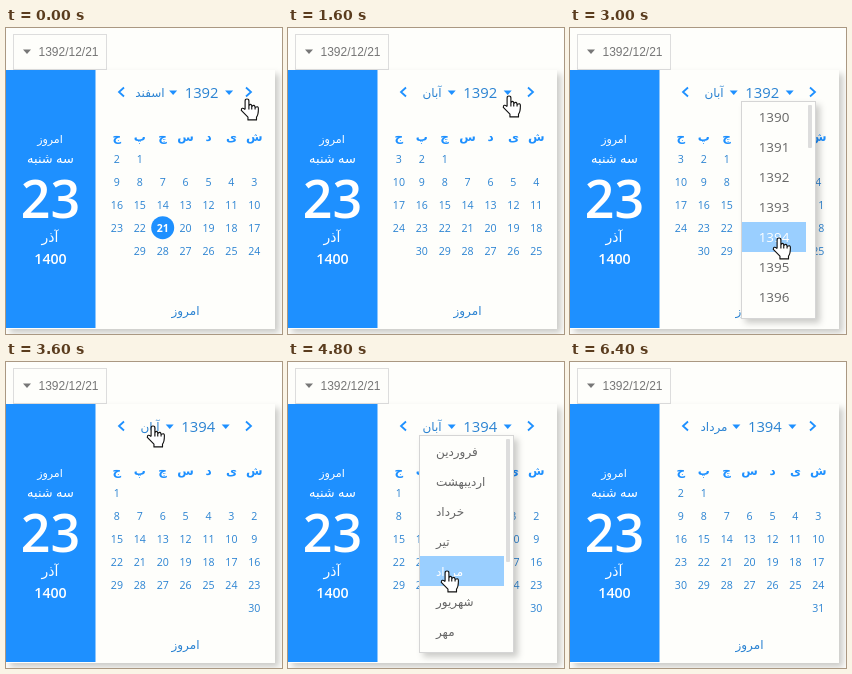
Write an HTML page that moves like this. It is 276 by 306 pixels and loops after 7.2 s.

```html
<!DOCTYPE html>
<html lang="fa">
<head>
<meta charset="utf-8">
<style>
html, body { margin: 0; width: 100%; height: 100%; overflow: hidden; background: #fefefb; }
svg { display: block; width: 276px; height: 306px; font-family: "Open Sans", "DejaVu Sans", sans-serif; }
.shadow { filter: drop-shadow(4px 4px 3px #0003); }
</style>
</head>
<body>
<svg id="stage" viewBox="0 0 276 306"></svg>
<script>
const LOOP = 7200, STEP = 200, MOVE = 400;
const BLUE = '#1e90ff', INK = '#2b83d2', PAPER = '#fefefb';
const MONTHS = 'فروردین اردیبهشت خرداد تیر مرداد شهریور مهر آبان آذر دی بهمن اسفند'.split(' ');
const YEARS = Array.from({ length: 7 }, (_, i) => 1390 + i);
const BACK_CLICKS = [600, 1000, 1200, 1400], YEAR_CLICK = 3200, MONTH_CLICK = 5000, EXIT = 6400;

// pointer stops: arrival time, x, y
const STOPS = [
  [0, 241, 71], [1800, 201, 65], [2800, 209, 210], [3600, 147, 64],
  [4400, 145, 110], [4800, 159, 209], [5400, 161, 212]
];

const pen = document.createElement('canvas').getContext('2d');
pen.font = '12px "Open Sans", "DejaVu Sans", sans-serif';

const text = (s, x, y, size, fill = INK, more = '') =>
  `<text x="${x}" y="${y}" font-size="${size}" fill="${fill}" text-anchor="middle" ${more}>${s}</text>`;
const rect = (x, y, w, h, fill, more = '') =>
  `<rect x="${x}" y="${y}" width="${w}" height="${h}" fill="${fill}" ${more}/>`;
const caret = (x, y, fill = BLUE) => `<path d="M${x - 4} ${y - 2}h8l-4 4.5z" fill="${fill}"/>`;
const chevron = (x, dir) =>
  `<path d="M${x + 2.5 * dir} 59.5l${-5 * dir} 4.5l${5 * dir} 4.5" fill="none" stroke="${BLUE}" stroke-width="1.8"/>`;
const column = i => 248.3 - 22.9 * (i % 7);
const BOLD = 'font-weight="bold"', SEMI = 'font-weight="600"';

function pointerAt(t) {
  const i = STOPS.findLastIndex(s => s[0] - MOVE <= t);
  const [end, x, y] = STOPS[i], [, x0, y0] = STOPS[Math.max(i - 1, 0)];
  const k = Math.min(1, (t - end) / MOVE + 1), e = k * k * (3 - 2 * k);
  return [x0 + (x - x0) * e, y0 + (y - y0) * e];
}

const frame =
  rect(7.5, 6.5, 93, 35, PAPER, 'stroke="#ddd"') + caret(21, 23.5, '#777') +
  text('1392/12/21', 62.5, 28, 12, '#777', 'font-family="Liberation Sans, sans-serif"') +
  `<g class="shadow">${rect(0, 42, 269, 259, PAPER)}</g>` + rect(0, 42, 89.5, 258, BLUE) +
  text('امروز', 44, 115, 11, '#fff') + text('سه شنبه', 44.5, 135, 13, '#fff') +
  text('23', 44.5, 190, 52, '#fff', SEMI) + text('آذر', 44, 214, 14, '#fff') +
  text('1400', 44.5, 236, 14.2, '#fff', SEMI) +
  [...'شیدسچپج'].map((d, i) => text(d, column(i), 112.5, 12, BLUE, BOLD)).join('') +
  text('امروز', 179.5, 287, 12) + chevron(115.5, 1) + chevron(242.5, -1);

function calendar(month, year) {
  const name = MONTHS[month], shift = (pen.measureText(name).width - 26) / 3;
  let out = text(name, 144, 69, 12) + caret(166 + shift, 64.5) +
    text(year, 194.5 + shift, 70, 14.8) + caret(222 + shift, 64.5);
  const length = month < 6 ? 31 : month < 11 ? 30 : 29;
  const first = (5 + 365 * (year - 1392) + 30 * month + Math.min(month, 6)) % 7;
  for (let d = 1; d <= length; d++) {
    const n = first + d - 1, x = column(n), y = 131 + 22.9 * Math.floor(n / 7);
    const picked = year == 1392 && month == 11 && d == 21;
    if (picked) out += `<circle cx="${x}" cy="${y}" r="11.5" fill="${BLUE}"/>`;
    out += picked ? text(d, x, y + 4, 10.6, '#fff', BOLD) : text(d, x, y + 4, 10.6);
  }
  return out;
}

function menu(items, x, w, thumb, pointerY, label) {
  const hover = Math.floor((pointerY - 75) / 30);
  return `<g class="shadow">${rect(x + .5, 73.5, w, 217, PAPER, 'stroke="#d5d5d5"')}</g>` +
    rect(x + w - 7, 77, 4, thumb, '#ddd', 'rx="1"') +
    items.map((s, i) => (i == hover ? rect(x + 1, 74 + 30 * i, w - 10, 30, '#9acfff') : '') +
      label(s, 93.5 + 30 * i, i == hover ? '#fff' : '#666')).join('');
}
const yearLabel = (s, y, fill) => text(s, 204, y + .5, 13.4, fill);
const monthLabel = (s, y, fill) => text(s, 148, y, 12, fill, 'style="text-anchor:start"');

function cursor(x, y, hand) {
  const d = hand
    ? 'M-2 11V2Q-2 0 0 0T2 2V7Q5 4 5 8Q8 5 8.5 9Q12 7 12 10Q12 17 10 19V22H1V19L-6 12Q-6 8-2 11M2 6V11M5 7V11M8.5 8V11'
    : 'M0 0V16L4 12.5L7 19L10 17.5L7 11.5H12Z';
  return `<path transform="translate(${x} ${y}) scale(.95)" d="${d}" fill="#fff" stroke="#111" stroke-width="1.2" stroke-linejoin="round"/>`;
}

function draw(now) {
  const t = Math.floor(now % LOOP / STEP) * STEP, [x, y] = pointerAt(t);
  const month = t < MONTH_CLICK ? 11 - BACK_CLICKS.filter(c => c <= t).length : 4;
  let out = frame + calendar(month, t < YEAR_CLICK ? 1392 : 1394);
  if (t >= 2000 && t < YEAR_CLICK) out += menu(YEARS, 171, 74, 43, y, yearLabel);
  if (t >= 4000 && t < MONTH_CLICK) out += menu(MONTHS.slice(0, 7), 131, 94, 123, y, monthLabel);
  if (t < EXIT) out += cursor(x, y, t < MONTH_CLICK);
  stage.innerHTML = out;
}

const stage = document.getElementById('stage'), start = performance.now();
function tick() {
  draw(performance.now() - start);
  requestAnimationFrame(tick);
}
tick();
</script>
</body>
</html>
```
